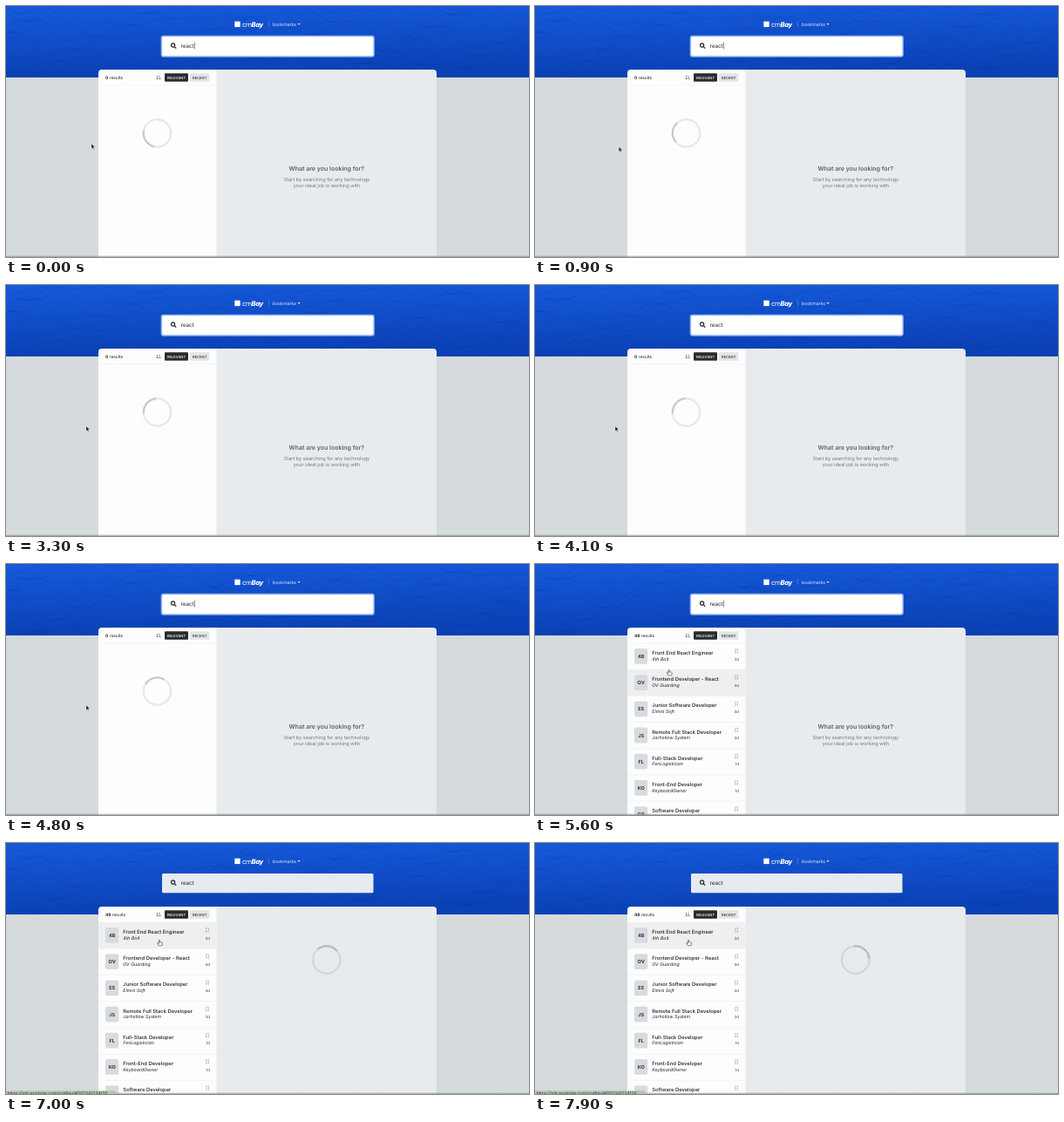
Animation of 600x288 px, one loop 8000 ms. Source, as an HTML page:

```html
<!DOCTYPE html>
<html lang="en">
<head>
<meta charset="utf-8">
<title>Job search</title>
<style>
html, body { margin: 0; width: 100%; height: 100%; overflow: hidden; }
svg { display: block; width: 600px; height: 288px; font-family: Inter, "Liberation Sans", sans-serif; text-rendering: geometricPrecision; }

/* Visibility switches on an 8 s timeline */
.loading, .loaded, .idle, .opened, .arrow, .hand, .over1, .over2, .status {
  animation: 8s step-end infinite;
}
.loading { animation-name: loading; }
.loaded { animation-name: loaded; }
.idle { animation-name: idle; }
.opened { animation-name: opened; }
.arrow { animation-name: arrow; }
.hand { animation-name: hand; }
.over1 { animation-name: over1; }
.over2 { animation-name: over2; }
.status { animation-name: status; }
@keyframes loading { 0% { opacity: 1; } 62.5%, 100% { opacity: 0; } }
@keyframes loaded { 0% { opacity: 0; } 62.5%, 100% { opacity: 1; } }
@keyframes idle { 0% { opacity: 1; } 76.25%, 100% { opacity: 0; } }
@keyframes opened { 0% { opacity: 0; } 76.25%, 100% { opacity: 1; } }
@keyframes arrow { 0% { opacity: 1; } 68.7%, 100% { opacity: 0; } }
@keyframes hand { 0% { opacity: 0; } 68.7%, 100% { opacity: 1; } }
@keyframes over2 { 0% { opacity: 0; } 68.7% { opacity: 1; } 72.4%, 100% { opacity: 0; } }
@keyframes over1 { 0% { opacity: 0; } 72.4%, 100% { opacity: 1; } }
@keyframes status { 0% { opacity: 0; } 72.5%, 100% { opacity: 1; } }

.caret { animation: blink 1s step-end infinite; }
@keyframes blink { 0% { opacity: 1; } 5% { opacity: 0; } 55%, 100% { opacity: 1; } }

.turn { animation: turn 1s steps(10) infinite; }
@keyframes turn { to { transform: rotate(360deg); } }

.pointer { animation: travel 8s linear infinite; }
@keyframes travel {
  0% { transform: translate(98px, 158px); }
  5%, 35% { transform: translate(96.2px, 161.5px); }
  39%, 67.5% { transform: translate(92px, 162px); }
  70% { transform: translate(153.5px, 121.3px); }
  74%, 100% { transform: translate(176px, 111.2px); }
}
</style>
</head>
<body>
<svg viewBox="0 0 600 288" xmlns="http://www.w3.org/2000/svg">
  <defs>
    <linearGradient id="sky" x2=".15" y2="1">
      <stop stop-color="#165adb"/>
      <stop offset="1" stop-color="#0a41b4"/>
    </linearGradient>
    <linearGradient id="edge" x2="0" y2="1">
      <stop stop-color="#70767a" stop-opacity="0"/>
      <stop offset="1" stop-color="#70767a" stop-opacity=".65"/>
    </linearGradient>
    <clipPath id="top"><path d="M0 0H600V82H0Z"/></clipPath>
    <g id="ring" fill="none" stroke-width="1.9">
      <circle r="15.7" stroke="#000" stroke-opacity=".1"/>
      <g class="turn"><circle r="15.7" stroke="#000" stroke-opacity=".17" pathLength="4" stroke-dasharray="1 3"/></g>
    </g>
  </defs>

  <path fill="#d5dadd" d="M0 0H600V288H0Z"/>
  <path fill="url(#sky)" d="M0 0H600V82H0Z"/>
  <g id="waves" clip-path="url(#top)" fill="none" stroke="#022a8c" stroke-opacity=".16" stroke-width=".8"/>

  <!-- Header -->
  <path fill="#fff" d="M262.3 17.7h6.4v6.4h-6.4z"/>
  <text x="271" y="23.6" font-size="7.6" letter-spacing="-.4" fill="#fff">crn<tspan font-weight="800" font-style="italic">Bay</tspan></text>
  <path stroke="#fff" stroke-opacity=".35" stroke-width=".6" d="M301.4 17.3v7"/>
  <text x="306" y="22.7" font-size="5.15" fill="#e3ebfb">bookmarks</text>
  <path fill="#e3ebfb" d="M334.5 20.1h3l-1.5 1.8z"/>

  <!-- Search field -->
  <rect x="179" y="35" width="242.5" height="22.3" rx="1.5" fill="#e6ebf1"/>
  <g class="idle">
    <rect x="178.4" y="34.4" width="243.7" height="23.5" rx="2.2" fill="#fff" stroke="#8fb2f5" stroke-width="1.5"/>
    <path class="caret" stroke="#222" stroke-width=".6" d="M216.4 41.8v7.6"/>
  </g>
  <g fill="none" stroke="#222" stroke-width="1.1">
    <circle cx="191.6" cy="45" r="2.1"/>
    <path stroke-width="1.3" d="M193.2 46.6l2 2"/>
  </g>
  <text x="200.5" y="47.9" font-size="6.25" fill="#222">react</text>

  <!-- Panels -->
  <path fill="#e7ebee" d="M241 73H490q4 0 4 4V288H241Z"/>
  <path fill="#fdfdfd" d="M241.5 73H110q-4 0-4 4V288H241.5Z"/>
  <path stroke="#ececec" stroke-width=".6" d="M106 91h135.5"/>

  <g font-size="4.85" fill="#222">
    <text class="loading" x="114" y="83.7"><tspan font-weight="700">0</tspan> results</text>
    <text class="loaded" x="114" y="83.7"><tspan font-weight="700">48</tspan> results</text>
  </g>
  <path fill="none" stroke="#444" stroke-width=".6" d="M173.6 79.8v4M172.7 83l.9 1 .9-1M175.2 80.4h1.3M175.2 82h2M175.2 83.7h2.7"/>
  <rect x="182" y="77.3" width="27" height="9.4" rx="1" fill="#2a2b2f"/>
  <rect x="211" y="77.3" width="22.3" height="9.4" rx="1" fill="#e1e5e8"/>
  <g font-size="4.1" font-weight="500" text-anchor="middle">
    <text x="195.5" y="83.5" fill="#fff">RELEVANT</text>
    <text x="222.2" y="83.5" fill="#333">RECENT</text>
  </g>

  <g class="loading"><use href="#ring" transform="translate(173.5 146) rotate(103)"/></g>
  <g class="loaded" id="rows"></g>

  <g class="idle" text-anchor="middle">
    <text x="367.8" y="189.4" font-size="7" font-weight="600" fill="#5c6063">What are you looking for?</text>
    <g font-size="5.56" fill="#75797c">
      <text x="368" y="200.5">Start by searching for any technology</text>
      <text x="368" y="207.5">your ideal job is working with</text>
    </g>
  </g>
  <g class="opened"><use href="#ring" transform="translate(367.7 134) rotate(85)"/></g>

  <path fill="url(#edge)" d="M0 286H600V288H0Z"/>
  <g class="status">
    <path fill="#b5c3af" d="M0 284.3H124.5q1.5 0 1.5 1.5V288H0Z"/>
    <text x="1.5" y="289.3" font-size="5" fill="#2c3828">https://job.example.com/crnBay/#1112341234126</text>
  </g>

  <g class="pointer">
    <path class="arrow" fill="#111" stroke="#fff" stroke-width=".4" d="M0 0V5.7L1.3 4.5 2.2 6.5 3.1 6.1 2.2 4.1H4Z"/>
    <path class="hand" fill="#fff" stroke="#222" stroke-width=".6" stroke-linejoin="round"
      d="M-.6 .5Q0-.3 .6 .5V2.4L3 3Q3.8 3.3 3.5 4.3L2.9 6.6H-.6L-2.4 3.9Q-2.3 3.1-1.5 3.5L-.6 4.2Z"/>
  </g>
</svg>

<script>
const jobs = [
  ["4B", "Front End React Engineer", "4th Bolt", "2d"],
  ["OV", "Frontend Developer - React", "OV Guarding", "4d"],
  ["ES", "Junior Software Developer", "Elmra Soft", "4d"],
  ["JS", "Remote Full Stack Developer", "Jarhollow System", "3d"],
  ["FL", "Full-Stack Developer", "FenLogistician", "1d"],
  ["KO", "Front-End Developer", "KeyboardOwner", "1d"],
  ["CS", "Software Developer", "Corvane Soft", "1d"]
];

const row = ([badge, title, firm, age], i) => `
  <g transform="translate(106 ${91 + i * 30.2})">
    ${i < 2 ? `<path class="over${i + 1}" fill="#efefef" d="M0 0H135.5V30.2H0Z"/>` : ""}
    <path stroke="#ececec" stroke-width=".6" d="M0 30.2h135.5"/>
    <rect x="8" y="6" width="15.2" height="17.8" rx="2" fill="#d6dbdf"/>
    <text x="15.7" y="17" font-size="5.6" font-weight="700" text-anchor="middle" fill="#33363a">${badge}</text>
    <text x="28.3" y="13.1" font-size="5.83" font-weight="500" fill="#1d1d1f">${title}</text>
    <text x="28.3" y="19.5" font-size="5.2" font-style="italic" fill="#222">${firm}</text>
    <path fill="none" stroke="#999" stroke-width=".5" d="M123.6 6.7h3v4.6l-1.5-1.2-1.5 1.2z"/>
    <text x="128" y="19.6" font-size="4.4" text-anchor="end" fill="#444">${age}</text>
  </g>`;
document.getElementById("rows").innerHTML = jobs.map(row).join("");

// Faint contour lines behind the header
const wave = k => {
  let d = "";
  for (let x = -10; x <= 610; x += 5) {
    const y = k * 8 + 7 * Math.sin(x / 19 + k * 0.8) + 4 * Math.sin(x / 8 - k * 1.7);
    d += (d ? "L" : "M") + x + " " + y.toFixed(1);
  }
  return `<path d="${d}"/>`;
};
document.getElementById("waves").innerHTML = Array.from({ length: 12 }, (_, k) => wave(k)).join("");
</script>
</body>
</html>
```
